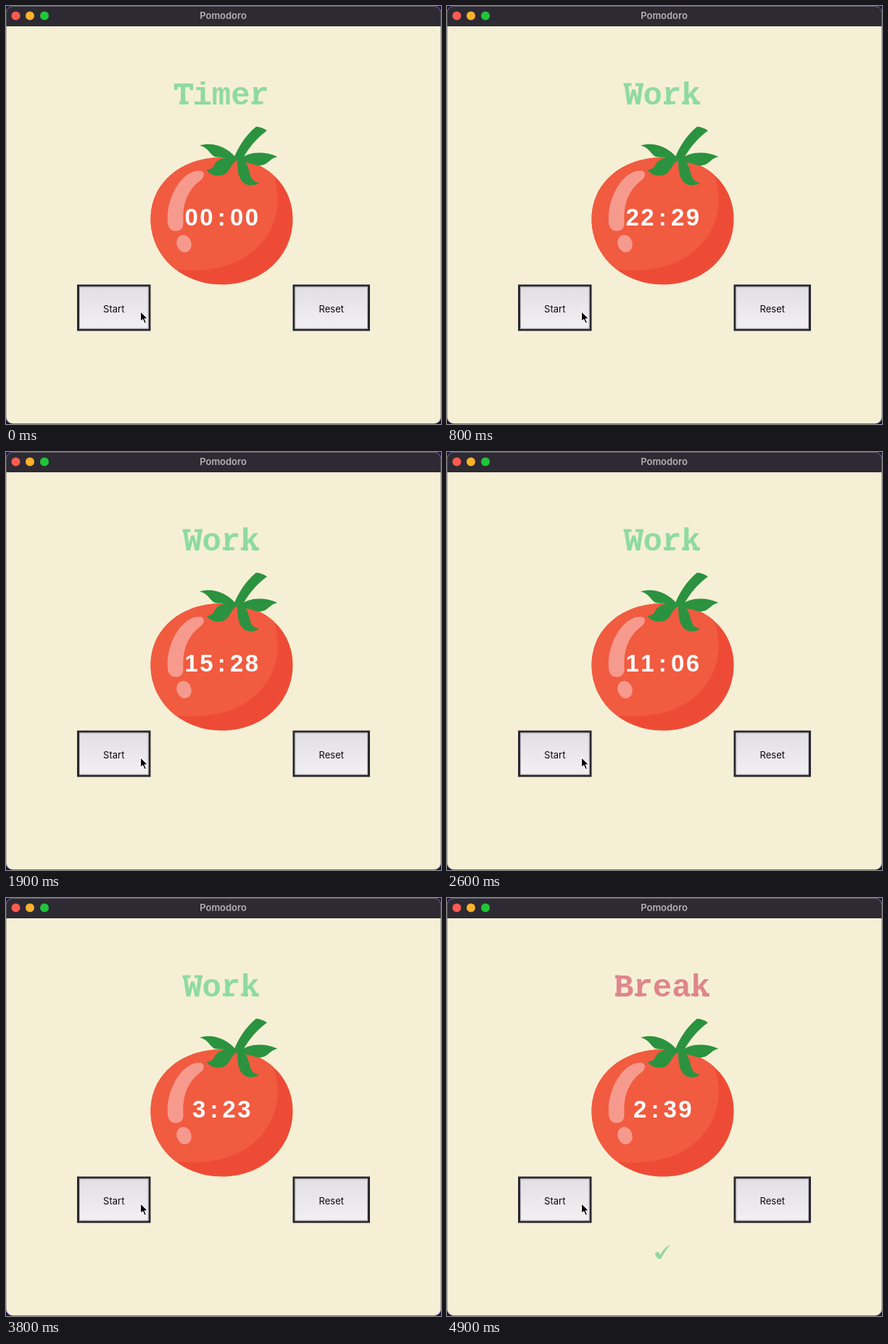
Recreate the animation shown at these times as an HTML page. Size 600 px wide and 577 px high, loop 5 s.

```html
<!DOCTYPE html>
<html lang="en">
<head>
<meta charset="utf-8">
<title>Pomodoro</title>
<style>
  html, body { margin: 0; width: 100%; height: 100%; overflow: hidden; background: #1b1147; }
  svg { display: block; width: 600px; height: 577px; }
  text { text-anchor: middle; }
  .bar { font: 600 13px Inter, sans-serif; fill: #b3b0b6; }
  .label { font: 13px Inter, sans-serif; fill: #0b0b0b; }
  .title { font: bold 44px "Liberation Mono", monospace; }
  .clock { font: bold 33px "Liberation Sans", sans-serif; fill: #fff; }
</style>
</head>
<body>
<svg viewBox="0 0 600 577">
  <defs>
    <clipPath id="win"><rect width="600" height="576.5" rx="9"/></clipPath>
    <path id="body" d="M298 209C356 209 395.5 245 395.5 294C395.5 345 354 384.500 298 384.500C242 384.500 199.500 345 199.500 294C199.500 245 240 209 298 209Z"/>
    <clipPath id="skin"><use href="#body"/></clipPath>
    <linearGradient id="face" x2="0" y2="1">
      <stop stop-color="#e1dfe3"/><stop offset="1" stop-color="#f3f0f4"/>
    </linearGradient>
  </defs>

  <rect width="600" height="577" fill="#1b1147"/>
  <g clip-path="url(#win)">
    <rect width="600" height="577" fill="#f5f0d5"/>
    <rect width="600" height="28" fill="#2d2a33"/>
    <rect width="600" height="1" fill="#56535c"/>
  </g>
  <rect x=".5" y=".5" width="599" height="576" rx="9" fill="none" stroke="#77747a" stroke-opacity=".55"/>
  <circle cx="13.500" cy="13.500" r="6" fill="#ff5b51"/>
  <circle cx="33" cy="13.500" r="6" fill="#fdb32b"/>
  <circle cx="53" cy="13.500" r="6" fill="#20c63a"/>
  <text class="bar" x="299.500" y="18">Pomodoro</text>

  <g id="heading">
    <text class="title" x="297" y="135.500"></text>
    <path id="slabs"/>
  </g>

  <use href="#body" fill="#ee4b36"/>
  <path clip-path="url(#skin)" fill="#f15b40" d="M367 228C380 262 378 300 350 330C322 360 280 368 236 364L190 360V190H367Z"/>
  <g fill="#f79a8e">
    <path d="M270 228C246 223 220 262 223 299C224 307 228 311 235 310.500C242 310 245 305 244.500 298C243 273 251 253 269 240C275 235 273 229 270 228Z"/>
    <ellipse cx="245.500" cy="328" rx="10" ry="12.200" transform="rotate(-18 245.500 328)"/>
  </g>
  <g fill="#2b923f">
    <path d="M314 211C320 195 330 179 345 166.500Q353 167 360 172C346 182 333 197 325 214Z"/>
    <path d="M267 192.500C285 187 304 194 317 209L312 213C304 207 296 210 288 208C281 205 280 196 267 192.500Z"/>
    <path d="M318 209C303 207 291 211 287 220C285 224 281 226 276.500 226C283 235 294 236 302 232C310 227 310 217 319 213Z"/>
    <path d="M319 211C319 226 320 239 329 245C336 249 344 248 349 244C340 242 338 238 336 230C334 222 332 216 325 211Z"/>
    <path d="M323 211C334 202 354 199 374.500 208C365 210 363 216 356 219C346 223 338 215 328 216Z"/>
  </g>
  <text class="clock" y="303"></text>

  <g id="buttons"></g>
  <path id="tick" fill="#8fd8a1" d="M286.500 491.500Q289 488 292 489L294 493C297 487 302 481 308 478.500C302 486 298 492 295.500 497.500Q293 499 290.500 497.500Z"/>
  <path fill="#000" stroke="#fff" stroke-width="1.100" stroke-linejoin="round" d="M185.500 421.500V435.500L188.700 432.600L191.200 438.300L193.600 437.200L191.200 431.700H195.600Z"/>
</svg>
<script>
const $ = s => document.querySelector(s);
const LOOP = 5000, STEP = 100;
const START = 5, BREAK = 46;
const MID = 297.3, PITCH = 20.8;

// step, seconds left
const work = [[5, 1464], [8, 1349], [19, 928], [26, 666], [32, 433], [43, 12], [44, 0], [45, 0]];
const rest = [[46, 273], [49, 159]];

const GREEN = "#8fdaa2", PINK = "#df868c";
const slabs = {
  Timer: "M239 131.500h13v4h-13zM232 107h4.500v9h-4.500zM253.500 107h4.500v9h-4.500zM338.500 131.500h16v4h-16z",
  Work: "M243.500 106.500h11v4h-11zM260 106.500h11v4h-11zM299 131.500h16v4h-16zM324 131.500h10v4h-10zM339 131.500h10v4h-10z",
  Break: "M232 106.500h6v4.500h-6zM232 131h6v4.500h-6zM259 131.500h16v4h-16zM337 131.500h10v4h-10zM352 131.500h10v4h-10z"
};

function button(x, w, label) {
  return `<rect x="${x + 1.5}" y="386" width="${w - 3}" height="61" fill="url(#face)" stroke="#29272f" stroke-width="3"/>
    <rect x="${x + 3.5}" y="388" width="${w - 7}" height="57" fill="none" stroke="#bcb9bf"/>
    <text class="label" x="${x + w / 2}" y="422.500">${label}</text>`;
}
$("#buttons").innerHTML = button(98, 101.5, "Start") + button(395.5, 106.5, "Reset");

function left(keys, n) {
  const i = Math.max(1, keys.findIndex(k => k[0] >= n));
  const [a, from] = keys[i - 1], [b, to] = keys[i];
  return Math.round(from + (to - from) * (n - a) / (b - a));
}

function clockText(n) {
  if (n < START) return "00:00";
  const s = left(n < BREAK ? work : rest, n);
  return Math.floor(s / 60) + ":" + String(s % 60).padStart(2, "0");
}

function draw(n) {
  const name = n < START ? "Timer" : n < BREAK ? "Work" : "Break";
  $("#heading").setAttribute("fill", name === "Break" ? PINK : GREEN);
  $(".title").textContent = name;
  $("#slabs").setAttribute("d", slabs[name]);
  $("#tick").style.display = name === "Break" ? "" : "none";

  const digits = clockText(n), clock = $(".clock");
  const xs = [...digits].map((_, i) => MID + (i - (digits.length - 1) / 2) * PITCH);
  clock.setAttribute("x", xs.join(" "));
  clock.textContent = digits;
}

const t0 = performance.now();
let shown = -1;
function tick() {
  const n = Math.floor((performance.now() - t0) % LOOP / STEP);
  if (n !== shown) draw(shown = n);
  requestAnimationFrame(tick);
}
tick();
</script>
</body>
</html>
```
